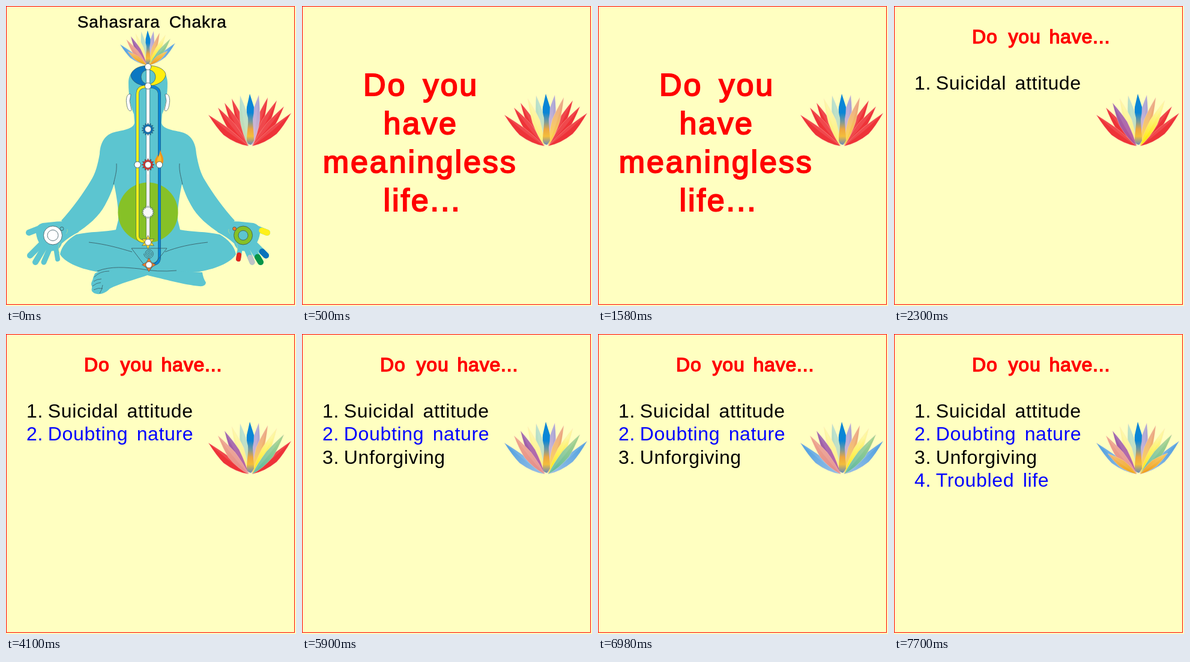
Animation of 483x499 px, one loop 8000 ms. Source, as an HTML page with a canvas:

```html
<!DOCTYPE html>
<html lang="en">
<head>
<meta charset="utf-8">
<title>Chakra</title>
<style>
  html, body { margin: 0; width: 100%; height: 100%; overflow: hidden; background: #ffffc1; }
  canvas, svg { position: absolute; left: 0; top: 0; width: 483px; height: 499px; }
  text { font-family: "Liberation Sans", Arial, sans-serif; }
</style>
</head>
<body>
<canvas id="stage" width="483" height="499"></canvas>
<svg id="words" viewBox="0 0 483 499"></svg>
<script>
const ctx = document.getElementById('stage').getContext('2d');
const words = document.getElementById('words');
const LOOP = 8000;
const STARTS = [0, 500, 2300, 4100, 5900, 7700];
const PAPER = '#ffffc1', SKIN = '#5cc5d0', INK = '#35535c';
const BLUE = '#0a86d6', YELLOW = '#fff01a', GREEN = '#86c127', RED = '#ee3338', ORANGE = '#f47b2a';

// ---------- helpers ----------
function paint(fill, stroke, width = 0.8) {
  if (fill) { ctx.fillStyle = fill; ctx.fill(); }
  if (stroke) { ctx.strokeStyle = stroke; ctx.lineWidth = width; ctx.stroke(); }
}
function shape(d, fill, stroke, width = 0.8) {
  const p = new Path2D(d);
  if (fill) { ctx.fillStyle = fill; ctx.fill(p); }
  if (stroke) { ctx.strokeStyle = stroke; ctx.lineWidth = width; ctx.stroke(p); }
}
function disc(x, y, r, fill, stroke, width) {
  ctx.beginPath();
  ctx.arc(x, y, r, 0, 7);
  paint(fill, stroke, width);
}
function star(x, y, n, outer, inner, fill) {
  ctx.beginPath();
  for (let i = 0; i < 2 * n; i++) {
    const r = i % 2 ? inner : outer, a = i * Math.PI / n - Math.PI / 2;
    ctx.lineTo(x + r * Math.cos(a), y + r * Math.sin(a));
  }
  ctx.closePath();
  paint(fill, INK, 0.6);
}
function tube(d, color, width) {
  shape(d, null, INK, width + 1);
  shape(d, null, color, width);
}
function mirrored(draw) {
  draw();
  ctx.save();
  ctx.translate(473, 0);
  ctx.scale(-1, 1);
  draw();
  ctx.restore();
}

// ---------- lotus, relative to its base ----------
// tips of each pair, outer and inner half width, colours [tip, base]
const PAIRS = [
  { l: [-17, -85], r: [14, -86], out: 7, inn: 8, cl: ['#b4dfc8', '#c4dcb4'], cr: ['#a9a3d4', '#d5b3cf'] },
  { l: [-31, -80], r: [29, -82], out: 6, inn: 7, cl: ['#fdf6a0', '#fdf07a'], cr: ['#eba57c', '#fbd04a'] },
  { l: [-43, -73], r: [44, -77], out: 8, inn: 6, cl: ['#9c62ab', '#b0529a'], cr: ['#fdf69a', '#ffe914'] },
  { l: [-54, -65], r: [56, -67], out: 9, inn: 5, cl: ['#eda18a', '#e58f8c'], cr: ['#9fd08c', '#68bda0'] },
  { l: [-70, -53], r: [68, -56], out: 11, inn: 3, cl: ['#58a4e0', '#8cbbe6'], cr: ['#58a4e0', '#8cbbe6'] },
  { l: [-51, -35], r: [49, -36], out: 6, inn: 6, cl: ['#f3b35c', '#f0a81c'], cr: ['#f6c04e', '#f0a01c'] }
];
const BACK_TO_FRONT = [4, 0, 1, 2, 3, 5];

function petal(side, tip, out, inn, colors) {
  const bx = side * 3, by = -1;
  const dx = tip[0] - bx, dy = tip[1] - by, len = Math.hypot(dx, dy);
  const nx = -dy / len * side, ny = dx / len * side;
  const at = (k, o) => [bx + dx * k + nx * o, by + dy * k + ny * o];
  const blade = (a, b) => {
    ctx.beginPath();
    ctx.moveTo(bx, by);
    ctx.quadraticCurveTo(...at(0.22, a * 0.95), ...at(0.52, a));
    ctx.quadraticCurveTo(...at(0.72, a * 0.8), ...tip);
    ctx.quadraticCurveTo(...at(0.72, b * 0.8), ...at(0.52, b));
    ctx.quadraticCurveTo(...at(0.22, b * 0.8), bx, by);
  };
  blade(out, -inn);
  const g = ctx.createLinearGradient(...tip, bx, by);
  g.addColorStop(0.2, colors[0]);
  g.addColorStop(0.8, colors[1]);
  paint(g, 'rgba(255,225,200,.55)', 0.6);
  blade(out * 0.2, -inn);
  paint('rgba(255,255,255,.1)');
}
function lotus(x, y, scale, opened) {
  ctx.save();
  ctx.translate(x, y);
  ctx.scale(scale, scale);
  const pair = (p, cl, cr) => {
    petal(-1, p.l, p.out, p.inn, cl);
    petal(1, p.r, p.out, p.inn, cr);
  };
  const red = [RED, RED];
  for (let i = 1; i < 5; i++) if (i >= opened) pair(PAIRS[i], red, red);
  for (const i of BACK_TO_FRONT) if (i < opened) pair(PAIRS[i], PAIRS[i].cl, PAIRS[i].cr);
  const g = ctx.createLinearGradient(0, -87, 0, -2);
  [BLUE, BLUE, '#7b9a9a', '#eea63f', '#f3bd3c', '#5c86c4'].forEach((c, i) =>
    g.addColorStop([0, 0.36, 0.54, 0.68, 0.82, 1][i], c));
  shape('M-1-88L6-66Q6-55 4-46C4-36 6-22 6-10Q3-5 1-3Q-5-4-6-10C-6-24-3-36-4-48Q-7-58-6-66Z', g);
  ctx.restore();
}

// ---------- seated figure ----------
const FINGERS = [
  [412, 368, 435, 377, 10, YELLOW],
  [410, 392, 433, 415, 10, '#0a73bb'],
  [406, 396, 424, 426, 10, '#079547'],
  [398, 398, 410, 426, 9, '#bfc3c6'],
  [391, 396, 387, 421, 8, '#e0261c']
];
function hand() {
  shape('M352 358Q382 357 412 361Q424 364 423 378Q420 400 402 407Q385 410 380 395Q368 384 352 376Z', SKIN);
  ctx.lineCap = 'round';
  for (const [x, y, tx, ty, w] of FINGERS) shape(`M${x} ${y}L${tx} ${ty}`, null, SKIN, w);
  ctx.lineCap = 'butt';
  shape('M383 393Q388 402 384 411M371 371Q369 375 373 379', null, '#a9d8a0', 0.8);
}
function fingertips() {
  ctx.lineCap = 'round';
  for (const [x, y, tx, ty, w, color] of FINGERS) {
    const k = color === YELLOW ? 0.62 : 0.72;
    shape(`M${x + (tx - x) * k} ${y + (ty - y) * k}L${tx} ${ty}`, null, color, w);
  }
  ctx.lineCap = 'butt';
}
function body() {
  mirrored(() => {
    // half torso with arm
    shape('M237 102C217 102 204 108 204 128C204 148 207 167 213 180L214 194C213 203 200 206 184 209' +
      'C163 213 157 229 156 246C153 263 149 279 141 291C129 311 111 336 92 357L117 378' +
      'C136 366 155 350 165 331C172 318 176 309 180 296C184 316 188 338 187 356L181 380H237Z', SKIN);
    // half of the folded legs
    shape('M237 370L184 372C164 376 139 375 117 380C103 388 92 400 90 413C97 425 118 436 151 442L237 447Z', SKIN);
    shape('M184 262C185 276 181 285 179 297', null, INK);
    shape('M208 147C202 144 199 154 201 163C202 172 206 177 209 173L206 158Z', '#fff', INK, 0.7);
  });
  // crossed feet
  shape('M148 445C158 438 190 436 238 438V447C215 455 188 462 173 470C164 480 152 481 146 477' +
    'C140 473 144 470 143 466C140 460 145 457 145 452Z', SKIN);
  shape('M236 438L327 443Q328 452 333 460Q332 467 322 466C298 464 262 454 236 448Z', SKIN);
  shape('M147 451Q156 441 172 441M146 458Q152 454 159 454M144 466Q151 460 158 460' +
    'M146 472Q154 468 161 470M156 478Q160 472 161 464', null, INK, 0.7);
  shape('M138 393C166 396 190 403 210 409M336 393C308 396 285 401 265 409' +
    'M152 441C175 432 200 435 222 437Q252 443 284 440', null, INK, 0.8);
  mirrored(hand);
  fingertips();
}
function marks() {
  disc(236.5, 343.5, 50, GREEN);

  // crown: split eye with a round centre
  shape('M237 99C219 99 208 108 208 116C210 127 223 133 237 133Z', '#0b78c2', INK, 0.7);
  shape('M237 99C253 99 266 106 266 115C264 126 250 133 237 133Z', '#ffee10', INK, 0.7);
  disc(237, 118, 12, SKIN, INK, 0.7);

  tube('M236.5 104V388', '#fff', 5);
  shape('M236.5 280V388', null, '#e3e3e3', 2);
  tube('M234 134Q219 134 219 147V382Q219 392 234 392', YELLOW, 4);
  tube('M239 134Q255.5 134 255.5 147V418Q255.5 430 240 430', BLUE, 4);

  shape('M209 403H268L238 441Z', null, INK, 0.8);
  ctx.beginPath();
  for (let a = 0; a < 22; a += 0.2) ctx.lineTo(238 + a * 0.38 * Math.cos(a), 412 + a * 0.38 * Math.sin(a));
  paint(null, INK, 0.8);

  shape('M257 239C258 247 263 249 262 259Q260 267 255 268Q249 266 248 259C248 252 251 254 252 247L254 251Z', '#ef941b');
  shape('M256 246Q260 253 258 260H252Q251 255 254 251Z', '#f8bd31');

  star(236.5, 205, 14, 10.5, 7.2, '#0a72bb');
  star(236.5, 264, 12, 10.5, 7, '#e62b22');
  star(236.5, 343, 16, 10.5, 7.6, '#f8f8f8');
  star(236.5, 393, 6, 11.5, 6, '#ffd92e');
  star(238, 430.5, 4, 11.5, 6, ORANGE);
  for (const [x, y] of [[236.5, 101], [236.5, 133], [236.5, 205], [236.5, 264],
    [219, 264], [255.5, 264], [236.5, 393], [238, 430.5]]) {
    disc(x, y, 5.2, '#fff', INK, 0.8);
  }

  disc(78, 381.5, 15.5, '#fff', INK);
  disc(78, 381.5, 9, '#fff', INK);
  disc(93, 370.5, 3, SKIN, INK);
  disc(395, 381.5, 15.5, GREEN, INK);
  disc(395, 381.5, 8, SKIN, INK);
  disc(380.5, 370.5, 3, ORANGE, INK);
}

// ---------- text ----------
const FONTS = {
  title: { size: 28, spacing: 1, gap: 6, weight: 0.4 },
  big: { size: 52, spacing: 2.9, gap: 0, weight: 2 },
  head: { size: 32, spacing: 0.8, gap: 0, weight: 1.4 },
  item: { size: 32, spacing: 0.65, gap: 5, weight: 0 }
};
function say(str, x, y, font, color) {
  const f = FONTS[font];
  const t = document.createElementNS('http://www.w3.org/2000/svg', 'text');
  t.textContent = str;
  t.setAttribute('x', x);
  t.setAttribute('y', y);
  t.style.cssText = `font-size:${f.size}px;letter-spacing:${f.spacing}px;word-spacing:${f.gap}px;` +
    `fill:${color};stroke:${color};stroke-width:${f.weight}`;
  words.append(t);
}
const ITEMS = ['Suicidal attitude', 'Doubting nature', 'Unforgiving', 'Troubled life'];

function list(count) {
  say('Do', 130, 62, 'head', '#f00');
  say('you', 190.5, 62, 'head', '#f00');
  say('have...', 258.5, 62, 'head', '#f00');
  for (let i = 0; i < count; i++) {
    const y = 139 + i * 38.4, color = i % 2 ? '#00f' : '#000';
    say(i + 1 + '.', 34, y, 'item', color);
    say(ITEMS[i], 69.8, y, 'item', color);
  }
}
function question() {
  say('Do', 102, 149, 'big', '#f00');
  say('you', 201.5, 149, 'big', '#f00');
  say('have', 135.5, 213, 'big', '#f00');
  say('meaningless', 34.8, 277, 'big', '#f00');
  say('life...', 135.5, 341, 'big', '#f00');
}

// ---------- scenes ----------
function render(scene) {
  ctx.fillStyle = PAPER;
  ctx.fillRect(0, 0, 483, 499);
  ctx.strokeStyle = '#f00';
  ctx.lineWidth = 1;
  ctx.strokeRect(0.5, 0.5, 480, 496);
  words.replaceChildren();

  if (scene === 0) {
    body();
    lotus(236.5, 99, 0.665, 6);
    marks();
    say('Sahasrara Chakra', 118.7, 36, 'title', '#000');
  } else if (scene === 1) {
    question();
  } else {
    list(scene - 1);
  }
  lotus(407, 234, 1, scene + 1);
}

let shown = -1;
function tick(now) {
  const t = now % LOOP;
  const scene = STARTS.filter(s => s <= t).length - 1;
  if (scene !== shown) render(shown = scene);
  requestAnimationFrame(tick);
}
render(shown = 0);
requestAnimationFrame(tick);
</script>
</body>
</html>
```
